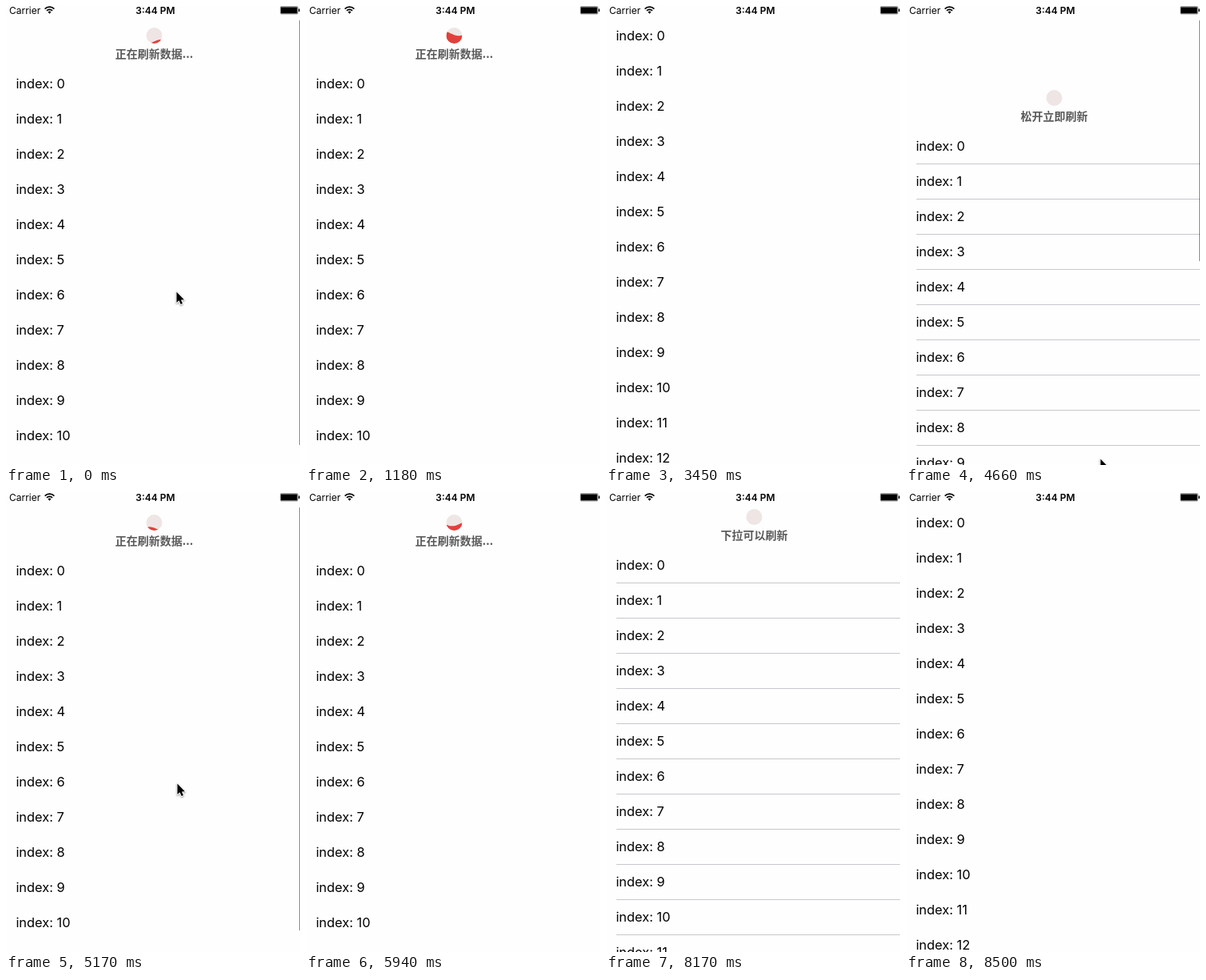
These frames come from a looping animation (368x574 px, 9040 ms). An HTML page with a canvas:

```html
<!DOCTYPE html>
<html lang="zh">
<head>
<meta charset="utf-8">
<title>Pull to refresh</title>
<style>
html, body { margin: 0; width: 100%; height: 100%; overflow: hidden; background: #fefefe; }
canvas { display: block; }
</style>
</head>
<body>
<canvas id="stage" width="368" height="574"></canvas>
<script>
const W = 368, H = 574, LOOP = 9040;
const TOP = 15, ROW = 44, HEADER = 60, TABLE = 647;
const DRAG = 4080, HOLD = 4640, RELEASE = 4780, SETTLE = 400;
const FIRST_END = 3050, SECOND_END = 8090;
const FILL_STARTS = [-240, 2470, 4970, 7720];
const BG = '#fefefe', RED = '#e2403c', PALE = '#efe5e5';
const UI = 'Inter, "Liberation Sans", sans-serif';
const CJK = '"Noto Sans CJK SC", "Noto Sans CJK", sans-serif';
const ctx = document.getElementById('stage').getContext('2d');

const clamp = v => Math.min(1, Math.max(0, v));
const progress = (t, from, length) => clamp((t - from) / length);
const ease = p => p * p * (3 - 2 * p);
const mix = (a, b, p) => a + (b - a) * p;

function text(str, x, y, font, color = '#000', align = 'left') {
  ctx.font = font;
  ctx.fillStyle = color;
  ctx.textAlign = align;
  ctx.fillText(str, x, y);
}

const fingerTravel = t => 320 * ease(progress(t, DRAG, HOLD - DRAG));
const rubberBand = d => TABLE * (1 - 1 / (d * 0.55 / TABLE + 1));

function scrollOffset(t) {
  let y;
  if (t < DRAG) y = HEADER * (1 - ease(progress(t, FIRST_END, 400)));
  else if (t < RELEASE) y = rubberBand(fingerTravel(t));
  else if (t < SECOND_END) y = mix(138.5, HEADER, ease(progress(t, RELEASE, SETTLE)));
  else y = HEADER * (1 - ease(progress(t, SECOND_END, 400)));
  return Math.round(y * 2) / 2;
}

const isRefreshing = t => t < FIRST_END || (t >= RELEASE && t < SECOND_END);

function drawBadge(t, cy, refreshing) {
  const cx = 185.5, r = 10;
  ctx.save();
  ctx.beginPath();
  ctx.arc(cx, cy, r, 0, Math.PI * 2);
  ctx.fillStyle = PALE;
  ctx.fill();
  const start = FILL_STARTS.filter(s => s <= t).pop();
  if (refreshing && t >= start) {
    ctx.clip();
    const level = cy + 10.2 - 0.0091 * (t - start);
    const crest = 154 + 0.0823 * t;
    ctx.beginPath();
    ctx.moveTo(cx - r, cy + r);
    for (let x = cx - r; x <= cx + r; x++) {
      ctx.lineTo(x, level - 3 * Math.cos((x - crest) * Math.PI / 20));
    }
    ctx.lineTo(cx + r, cy + r);
    ctx.fillStyle = RED;
    ctx.fill();
  }
  ctx.restore();
}

function drawHeader(t, offset) {
  const refreshing = isRefreshing(t);
  const y = Math.floor(offset) - HEADER;
  drawBadge(t, y + 37, refreshing);
  const label = refreshing ? '正在刷新数据...'
    : offset >= HEADER && t < RELEASE ? '松开立即刷新' : '下拉可以刷新';
  text(label, 185.5, y + 65, `bold 14px ${CJK}`, '#5a5a5a', 'center');
}

function drawRows(offset) {
  const shift = Math.floor(offset);
  // Half-point hairlines only land on a pixel at half-point offsets.
  const hairlines = offset % 1 !== 0;
  for (let i = 0; i < 14; i++) {
    const top = TOP + shift + i * ROW;
    text(`index: ${i}`, 12.4, top + 28, `16.4px ${UI}`);
    if (hairlines) {
      ctx.fillStyle = '#c8c7cc';
      ctx.fillRect(13, top + ROW, W - 13, 1);
    }
  }
}

function drawScrollbar(t, offset) {
  let alpha = 0;
  if (t < 1000) alpha = 1 - progress(t, 200, 260);
  else if (t >= DRAG) alpha = 1 - progress(t, 5400, 260);
  if (!alpha) return;
  const inset = t < DRAG ? HEADER : HEADER * progress(t, RELEASE, SETTLE);
  const length = 531 - 1.66 * Math.max(0, offset - inset);
  ctx.fillStyle = `rgba(0,0,0,${0.45 * alpha})`;
  ctx.fillRect(367, 18, 1, Math.round(length));
}

function drawStatusBar() {
  ctx.fillStyle = BG;
  ctx.fillRect(0, 0, W, TOP);
  text('Carrier', 4, 10, `12px ${UI}`);
  text('3:44 PM', 187, 10, `600 12px ${UI}`, '#000', 'center');

  ctx.strokeStyle = '#000';
  ctx.lineWidth = 1.7;
  for (const r of [5, 8.3]) {
    ctx.beginPath();
    ctx.arc(54.5, 9.4, r, -Math.PI * 0.75, -Math.PI * 0.25);
    ctx.stroke();
  }
  ctx.fillStyle = '#000';
  ctx.beginPath();
  ctx.moveTo(54.5, 9.8);
  ctx.arc(54.5, 9.4, 2.8, -Math.PI * 0.75, -Math.PI * 0.25);
  ctx.fill();

  ctx.lineWidth = 0.6;
  ctx.strokeStyle = '#555';
  ctx.beginPath();
  ctx.roundRect(343.4, 0.6, 22, 9.4, 1.5);
  ctx.stroke();
  ctx.fillRect(344, 1.4, 20.6, 8);
  ctx.fillRect(366.2, 3.5, 1.4, 3.5);
}

function cursorPosition(t) {
  if (t < 220) return [213, 357];
  if (t >= DRAG && t < RELEASE) {
    const d = fingerTravel(t);
    return [232 + d * 11 / 320, 246 + d];
  }
  if (t >= RELEASE && t < 5430) {
    const p = ease(progress(t, RELEASE + 60, 370));
    return [mix(243, 213, p), mix(566, 357, p)];
  }
  return null;
}

function drawCursor(t) {
  const at = cursorPosition(t);
  if (!at) return;
  ctx.save();
  ctx.translate(Math.round(at[0]), Math.round(at[1]));
  ctx.beginPath();
  [[0.5, 0.5], [0.5, 14], [3.6, 11.2], [5.7, 16], [8, 15], [6, 10.4], [10, 10.2]]
    .forEach(([x, y]) => ctx.lineTo(x, y));
  ctx.closePath();
  ctx.lineJoin = 'round';
  ctx.lineWidth = 2;
  ctx.strokeStyle = '#fff';
  ctx.shadowColor = 'rgba(0,0,0,.4)';
  ctx.shadowBlur = 2;
  ctx.shadowOffsetY = 1;
  ctx.stroke();
  ctx.shadowColor = 'transparent';
  ctx.fillStyle = '#000';
  ctx.fill();
  ctx.restore();
}

function draw(t) {
  const offset = scrollOffset(t);
  ctx.fillStyle = BG;
  ctx.fillRect(0, 0, W, H);
  drawHeader(t, offset);
  drawRows(offset);
  drawScrollbar(t, offset);
  drawStatusBar();
  drawCursor(t);
}

const began = performance.now();
function tick() {
  draw((performance.now() - began) % LOOP);
  requestAnimationFrame(tick);
}
tick();
</script>
</body>
</html>
```
